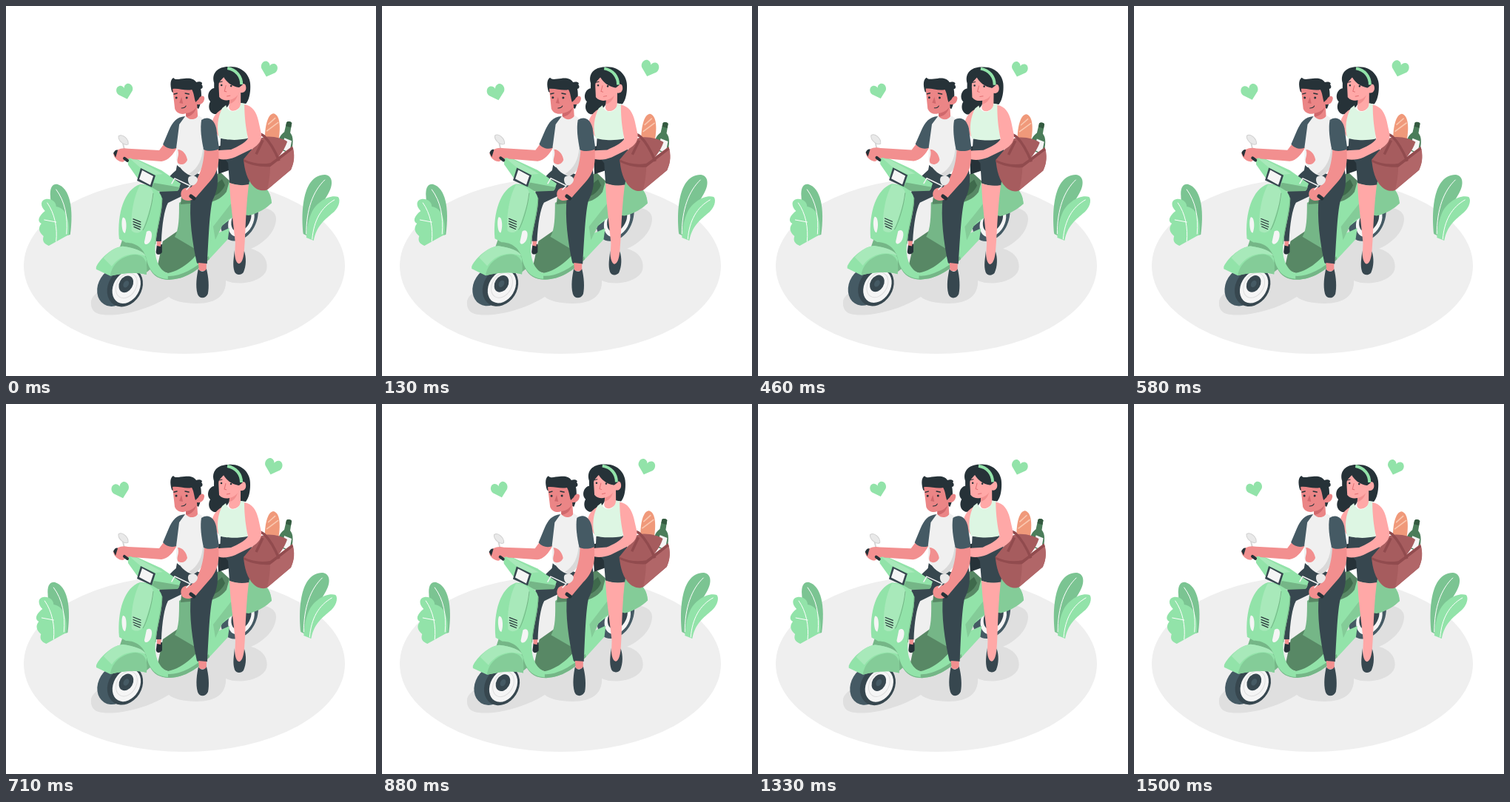
Write an HTML page that moves like this. It is 500 px wide and 500 px high and loops after 1540 ms.

```html
<!DOCTYPE html>
<html lang="en">
<head>
<meta charset="utf-8">
<title>Scooter ride</title>
<style>
html, body { margin: 0; width: 100%; height: 100%; overflow: hidden; background: #fff; }
svg { display: block; width: 100vw; height: 100vh; }
.g { fill: #92e3a9; }
.gl { fill: #a8e9ba; }
.gs { fill: #84cc98; }
.gm { fill: #75b687; }
.gd { fill: #588865; }
.leaf { fill: #7bc492; }
.ink { fill: #263238; }
.dark { fill: #37474f; }
.slate { fill: #455a64; }
.man { fill: #f28f8f; }
.face { fill: #eb8586; }
.lady { fill: #ffa8a7; }
.white { fill: #f5f5f5; }
.line { fill: none; stroke: #263238; stroke-linecap: round; }
.vein { fill: none; stroke: #fff; stroke-width: 1; stroke-linecap: round; }
</style>
</head>
<body>
<svg viewBox="0 0 500 500">
<defs>
  <path id="heart" class="g" d="M0 10L-9.500 1.500C-13-3-10-10-5-9.500C-2-9-.5-7 0-5C.5-7 2-9 5-9.500C10-10 13-3 9.500 1.500Z"/>
</defs>

<ellipse cx="241" cy="351" rx="217" ry="119" fill="#efefef"/>
<path fill="#dfdfdf" d="M115 403C113 388 135 380 160 375L330 271C350 271 366 275 365 289C363 309 345 322 331 328C348 332 355 345 352 357C346 373 315 379 297 371C298 390 285 402 258 402C240 402 225 398 220 393C190 412 150 420 130 417C118 416 115 408 115 403Z"/>

<g id="hearts">
  <use href="#heart" transform="translate(163 115.5) rotate(-16)"/>
  <use href="#heart" transform="translate(353 86) rotate(18)"/>
</g>

<g id="plants">
  <path class="leaf" d="M79 311C68 290 60 272 60 254C60 244 64 240 70 241C86 246 92 272 87 309Z"/>
  <path class="g" d="M58 324C51 321 49 317 51 311C45 306 43 300 48 294C42 291 44 284 53 277C46 270 47 262 54 261C62 260 68 265 68 271C74 272 79 275 82 283C85 290 86 298 85 309Z"/>
  <path class="vein" d="M68 248C80 264 84 285 82 308M56 266C66 280 70 300 68 318M52 289L68 292"/>
  <path class="leaf" d="M402 308C399 280 400 229 431 228C443 229 442 243 436 253C428 268 416 280 412 313Z"/>
  <path class="g" d="M406 313L416 317C420 297 430 290 440 281C450 274 453 262 449 258C438 254 418 265 412 282C408 292 407 302 406 313Z"/>
  <path class="vein" d="M431 235C415 250 406 275 406 308M444 262C426 272 416 290 414 315"/>
</g>

<g id="ride">
  <!-- rear wheel and body -->
  <path class="slate" d="M290 298C293 314 302 319 313 317C330 313 342 295 341 272L326 268Z"/>
  <ellipse class="white" cx="318" cy="290" rx="16" ry="23" transform="rotate(28 318 290)"/>
  <ellipse class="dark" cx="318" cy="288" rx="12" ry="18" transform="rotate(28 318 288)"/>
  <path class="gd" d="M212 318L232 304L275 310L258 350L222 362L204 356Z"/>
  <path class="gm" d="M234 266L262 250L285 300L262 332L228 312C234 302 234 285 234 266Z"/>
  <path class="g" d="M198 345C201 357 208 363 219 361C240 357 260 338 275 312L302 300L300 315L275 342C258 358 243 369 221 370C205 370 195 361 190 345Z"/>
  <path class="gm" d="M194 354C199 365 208 370 221 370C243 369 258 358 275 342L274 338C255 356 234 366 219 365C207 364 200 359 194 350Z"/>
  <path class="g" d="M266 318L283 316L292 297L308 284L359 266C358 249 348 239 328 236L298 236L262 258Z"/>
  <path class="gs" d="M283 316L292 297C300 285 316 280 328 283C341 280 352 273 359 266C358 249 348 239 328 236C318 250 300 272 280 298Z"/>
  <path class="gd" d="M238 248L290 225L302 236L298 251C290 262 277 267 262 266L236 268Z"/>
  <path fill="#3f6a4c" d="M262 258L292 234L296 242C290 256 276 260 262 262Z"/>
  <path class="ink" d="M285 190L302 186L304 221L287 227Z"/>

  <!-- front wheel -->
  <ellipse class="slate" cx="147.500" cy="379.500" rx="22.500" ry="28" transform="rotate(32 147.500 379.500)"/>
  <ellipse class="dark" cx="161" cy="380" rx="22.500" ry="28" transform="rotate(32 161 380)"/>
  <ellipse class="white" cx="163" cy="380" rx="17.500" ry="23.500" transform="rotate(30 163 380)"/>
  <ellipse cx="163" cy="378" rx="13" ry="18" transform="rotate(30 163 378)" fill="none" stroke="#ddd"/>
  <ellipse class="dark" cx="162.500" cy="376" rx="9" ry="12" transform="rotate(30 162.500 376)"/>
  <ellipse class="slate" cx="162.500" cy="376" rx="3.500" ry="5" transform="rotate(30 162.500 376)"/>

  <!-- far leg, leg shield, fender -->
  <path class="ink" d="M204 323L211 322L211 333C207 338 202 336 203 331Z"/>
  <path class="man" d="M204 316L210 316L209 325L204 324Z"/>
  <path class="dark" d="M238 216C224 225 207 243 205 262L203 318L210 318C211 295 214 275 219 266L252 250L262 228Z"/>
  <path class="gm" d="M160 308L200 306L200 352L190 360L154 326Z"/>
  <path class="g" d="M153 315C150 280 160 248 181 241C196 241 208 248 211 260C212 278 204 300 202 322C200 340 207 358 219 361L219 369C202 368 195 358 191 346C188 328 176 320 162 320Z"/>
  <path class="gl" d="M181 242C194 242 201 248 199 260L186 300C182 308 174 308 170 304C168 285 172 258 181 242Z"/>
  <path d="M199 253C197 272 190 295 185 303M211 260C211 278 203 302 202 322" fill="none" stroke="#75b687" stroke-width="1"/>
  <path class="line" stroke-width="1.200" d="M172 288L182 292M172 291.500L182 295.500M172 295L182 299M173 298.500L181 302"/>
  <path class="white" d="M158 286C163 285 164 300 161 307C157 308 155 291 158 286ZM190 305C196 301 199 307 196 316C193 323 187 324 187 319Z"/>
  <path class="g" d="M122 353C128 340 145 326 158 325C174 327 187 332 190 342L190 363C174 359 158 361 141 365L122 356Z"/>
  <path class="gl" d="M132 341C140 331 148 326 158 325C173 327 186 331 189 338C170 331 153 338 143 352Z"/>
  <path class="gs" d="M141 365C143 349 157 337 175 336C190 337 192 350 190 363C174 359 158 361 141 365Z"/>

  <!-- handlebar -->
  <path class="line" style="stroke:#d5d5d5" stroke-width="2" d="M158 186L161 199L174 206"/>
  <path d="M152 176C157 172 166 180 165 187C160 190 151 182 152 176Z" fill="#e9e9e9" stroke="#d0d0d0"/>
  <path class="g" d="M164 205L177 207L210 222L236 240L233 249L204 250L180 236L165 215Z"/>
  <path class="gm" d="M200 239L235 245L232 250L207 251L197 245Z"/>
  <path class="gl" d="M168 207L177 208L212 227L202 228L182 219Z"/>
  <path class="dark" d="M182 219L202 229L197 245L177 236Z"/>
  <path class="white" d="M184 222L199 230L195 242L180 234Z"/>

  <!-- woman -->
  <path class="ink" d="M281 104C277 91 286 82 300 82C319 80 331 94 330 109C330 119 328 127 324 132L303 129C301 136 291 147 281 146C273 143 273 134 276 129C270 123 274 112 281 111Z"/>
  <path class="lady" d="M292 139C282 145 277 154 279 162L287 176L296 165Z"/>
  <path class="lady" d="M287 104L288 123C292 128 298 128 302 127L301 137C302 144 312 143 317 135L317 117C323 118 326 112 323 106C319 103 315 107 314 110L294 96Z"/>
  <path d="M302 127C307 126 311 123 313 120C311 127 307 131 302 132Z" fill="#f28f8f"/>
  <path class="ink" d="M283 106C284 94 291 87 300 84C313 84 320 95 320 106L315 110C305 109 297 102 294 96C290 98 287 103 287 108Z"/>
  <path d="M299 84C311 86 318 95 318 106" fill="none" stroke="#92e3a9" stroke-width="4"/>
  <circle class="ink" cx="291" cy="107" r="1.300"/><circle class="ink" cx="304" cy="108" r="1.300"/>
  <path class="line" stroke-width="1" d="M288 103L292 102M302 104L307 105"/>
  <path d="M297 107L295 115L298 116M298 122L303 121" fill="none" stroke="#e27174" stroke-width="1"/>
  <path class="dark" d="M290 179C300 177 315 178 326 178C334 190 334 208 331 224L328 242C319 243 309 242 302 239L300 212L289 198Z"/>
  <path d="M292 138C286 150 284 165 288 178C296 181 312 182 326 179C326 165 328 147 322 132L317 131C316 145 300 146 297 134Z" fill="#ddf6e3"/>
  <path class="lady" d="M302 239C311 242 319 243 328 241C325 265 324 290 323 315L321 347C318 352 311 352 309 346L310 320C307 290 303 265 302 239Z"/>
  <path class="dark" d="M309 330C309 353 320 355 322 331C325 340 325 351 321 360C318 364 311 364 309 359C306 350 308 341 309 330Z"/>

  <!-- bread, bottle, basket -->
  <path d="M350 182C349 165 353 146 361 145C369 146 372 160 368 182Z" fill="#f0997a"/>
  <path d="M354 160L364 151M352 169L368 157" stroke="#fac8b0" stroke-width="1.600"/>
  <path d="M379 157C381 155 385 156 386 158L384 171C389 177 388 186 385 200L367 192C367 178 372 173 376 170Z" fill="#4b7d5a"/>
  <path d="M379 157C381 155 385 156 386 158L385 164L378 162Z" fill="#345a40"/>
  <path class="white" d="M376 178L386 182L383 198L373 193Z"/>
  <path d="M321 207L358 211L387 189C391 205 388 214 385 221L353 248C347 251 339 248 335 244C326 236 322 221 321 207Z" fill="#a65c5e"/>
  <path d="M357 216L388 192C391 206 388 214 385 221L353 248C355 239 357 228 357 216Z" fill="#b16668"/>
  <path d="M321 207L345 178C355 174 373 178 380 183C376 195 367 207 358 213C345 215 330 212 321 207Z" fill="#a65c5e"/>
  <path d="M321 207C333 213 346 214 357 212L387 190L388 193L357 217C344 218 330 215 321 210Z" fill="#914b4e"/>
  <path d="M328 186C329 174 341 169 349 176C358 185 364 197 369 209M338 200L347 181" fill="none" stroke="#914b4e" stroke-width="3.500"/>
  <path class="lady" d="M322 133C333 135 338 143 341 155L345 173C346 184 338 190 330 194L310 204C300 208 288 209 283 204C280 200 282 196 288 195L304 194C313 190 322 186 327 179C324 165 322 150 322 133Z"/>

  <!-- man -->
  <path class="ink" d="M224 116C221 106 222 99 226 97C229 101 235 98 241 98C248 97 254 98 257 103C262 101 267 104 264 106C267 109 265 112 263 112C265 122 263 134 260 139L252 134Z"/>
  <path class="face" d="M225 112L228 139C231 146 238 147 243 145L243 153C249 158 257 153 259 149L258 133C265 134 268 129 268 124C267 120 262 121 260 126L256 130C254 124 254 118 251 113C242 115 234 111 225 112Z"/>
  <path d="M243 145C250 144 254 141 257 137C255 145 250 149 243 150Z" fill="#cf686c"/>
  <path d="M237 123L234 131L239 132Z" fill="#cf686c"/>
  <circle class="ink" cx="230" cy="124" r="1.500"/><circle class="ink" cx="244" cy="124" r="1.500"/>
  <path class="line" stroke-width="1.500" d="M227 119L231 118M242 118L247 119"/>
  <path class="line" stroke-width="1" d="M237 138C240 138 242 137 243 135"/>
  <path class="man" d="M213 187L207 195L165 193C156 191 149 194 145 200C146 206 152 211 158 211C163 208 167 204 171 207L210 210C219 209 226 201 231 191Z"/>
  <path class="line" stroke-width="4" d="M160 206L164 209"/>
  <path class="ink" d="M145 199C147 195 149 194 151 195L148 205Z"/>
  <path class="dark" d="M231 215C239 223 256 230 269 226L284 218C288 235 286 250 279 263C275 280 274 312 272 348C267 351 262 350 258 347C252 320 247 286 250 258L240 242L228 232Z"/>
  <path d="M231 155C235 150 240 149 243 149C249 156 257 153 260 148L269 154L270 193C271 210 265 224 253 230C242 228 233 218 230 208Z" fill="#f0f0f0"/>
  <path d="M266 192L270 192C271 211 265 224 253 230L247 227C260 219 265 207 266 192Z" fill="#d9d9d9"/>
  <path class="man" d="M232 194C239 194 244 201 245 208C243 214 236 216 232 212C230 206 235 202 232 194Z"/>
  <path class="slate" d="M242 149C230 150 225 157 220 168L212 187C217 193 224 194 230 192L234 160Z"/>
  <path class="man" d="M268 193L287 193C289 215 285 228 272 241L259 256C253 264 243 265 238 260C235 255 236 248 242 246L250 245C259 235 267 220 268 193Z"/>
  <path class="slate" d="M264 154C273 148 281 153 284 165L288 193C282 196 273 197 267 194C264 180 262 166 264 154Z"/>
  <path class="line" style="stroke:#f5f5f5" stroke-width="1.500" d="M224 240L228 233L249 243L244 248"/>
  <path d="M247 231C252 227 259 230 259 235C258 240 253 244 249 242C246 239 245 234 247 231Z" fill="#e9e9e9"/>
  <path class="line" stroke-width="5" d="M250 257L254 260"/>
  <path class="man" d="M260 347L271 348L271 358L261 358Z"/>
  <path class="dark" d="M260 355C262 360 269 360 271 355C274 366 275 380 273 389C270 396 261 396 259 389C256 378 258 365 260 355Z"/>
</g>
</svg>
<script>
const LOOP = 1540, CYCLE = 1500, LEAD = 33;

// Piecewise linear track of [time, value] stops.
function track(stops, t) {
  const i = Math.max(1, stops.findIndex(s => s[0] >= t));
  const [t0, a] = stops[i - 1], [t1, b] = stops[i];
  return a + (b - a) * (t - t0) / (t1 - t0);
}

const sway = [[0, 0], [375, 1], [1125, -1], [1500, 0]];
const shake = [0, -1, 2, -4, 4, -4, 4, -4, 2, -1, 0].map((x, i) => [i * 150, x]);
const beat = [[0, 1.02], [150, 1.1], [390, 1], [470, 1], [640, 1.1], [1050, 1], [1500, 1]];

const el = id => document.getElementById(id);
const ride = el('ride'), plants = el('plants'), hearts = el('hearts');

function draw(now) {
  const t = Math.min(now % LOOP, CYCLE), p = (t + LEAD) % CYCLE;
  ride.setAttribute('transform', `rotate(${track(sway, p)} 250 245)`);
  plants.setAttribute('transform', `translate(${track(shake, p)} 0)`);
  hearts.setAttribute('transform', `translate(258 100) scale(${track(beat, t)}) translate(-258 -100)`);
  requestAnimationFrame(draw);
}
draw(0);
</script>
</body>
</html>
```
